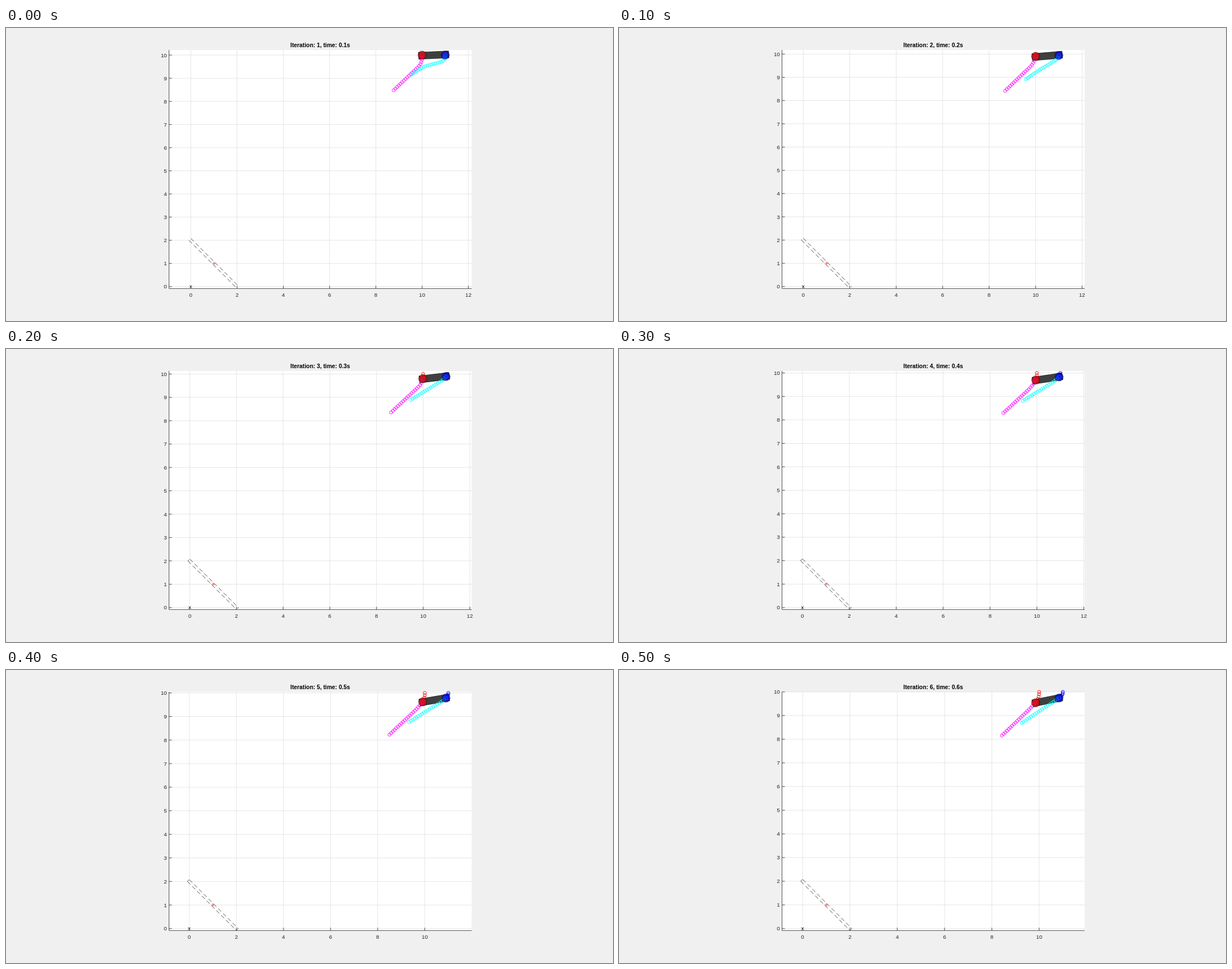
Recreate the animation shown at these times as an HTML page. Size 1078x520 px, loop 0.6 s.

```html
<!DOCTYPE html>
<html lang="en">
<head>
<meta charset="utf-8">
<style>
  html, body { margin: 0; width: 100%; height: 100%; overflow: hidden; background: #f0f0f0; }
  svg { display: block; font: 9.8px "Liberation Sans", Arial, sans-serif; }
</style>
</head>
<body>
<svg id="stage" width="1078" height="520" viewBox="0 0 1078 520"></svg>
<script>
const stage = document.getElementById('stage');
const STEP = 100, COUNT = 6;
const BOX = { left: 289.5, top: 39, right: 827, bottom: 462.4 };
const INK = '#262626';

// Plot coordinates of both axles at each step
const rear = [[10, 10], [10, 9.9], [9.98, 9.8], [9.95, 9.7], [9.91, 9.62], [9.85, 9.54]];
const front = [[11, 10], [11, 9.94], [10.98, 9.89], [10.95, 9.83], [10.9, 9.78], [10.84, 9.74]];
const originX = [328.2, 327.2, 326.4, 325.8, 325.5, 326.1];

// Screen waypoints of the planned paths, after the current axle
const rearPlan = [
  'L738.7 57L736 64.5L730 71L688.5 110.5',
  'L738 57.5L733 66L728 71L685.8 111.5',
  'L738.5 59L735 64.5L729 70.5L684 112.5',
  'L736 62.5L728 71.5L682.5 113.7',
  'L734.5 63L728 70.5L681 114.7',
  'L733 65L728 70.5L680 116.5'
];
const frontPlan = [
  'L778.5 55L775 59L769 61.3L758 64L743 68.5L731 75.5L719.5 83',
  'L778.5 55L763 65L748 73.5L722.5 91',
  'L774 56.5L759 65.5L718.5 90.5',
  'L772 58L757 67.5L717.3 92',
  'L771 58L757 66.5L716 92.5',
  'L768 59L757 66L715.2 94'
];

const probe = document.createElementNS('http://www.w3.org/2000/svg', 'path');
const path = (d, stroke, width = 0.8, extra = '') =>
  `<path d="${d}" fill="none" stroke="${stroke}" stroke-width="${width}" ${extra}/>`;
const ring = ([x, y], color) =>
  `<circle cx="${x}" cy="${y}" r="2.8" fill="none" stroke="${color}" stroke-width=".9"/>`;
const label = (x, y, text, anchor) =>
  `<text x="${x}" y="${y}" text-anchor="${anchor}" fill="${INK}">${text}</text>`;

function plan(start, route, color) {
  probe.setAttribute('d', `M${start}${route}`);
  const length = probe.getTotalLength();
  return Array.from({ length: 21 }, (_, i) => {
    const p = probe.getPointAtLength(length * i / 20);
    return ring([p.x, p.y], color);
  }).join('');
}

function wheel([x, y], color) {
  const points = Array.from({ length: 10 }, (_, i) => {
    const a = i * Math.PI / 5;
    return [x + 7.4 * Math.cos(a), y + 7.4 * Math.sin(a)];
  });
  return `<polygon points="${points.join(' ')}" fill="${color}" fill-opacity=".6" stroke="#000" stroke-width=".6"/>`;
}

function axes(px, py) {
  let grid = '', ticks = '', labels = '';
  for (let v = 0; v <= 12; v += 2) {
    const x = px(v);
    if (x > BOX.right) continue;
    grid += `M${x} ${BOX.top}V${BOX.bottom}`;
    ticks += `M${x} ${BOX.bottom}v-5`;
    labels += label(x, 476.5, v, 'middle');
  }
  for (let v = 0; v <= 10; v++) {
    const y = py(v);
    grid += `M${BOX.left} ${y}H${BOX.right}`;
    ticks += `M${BOX.left} ${y}h5`;
    labels += label(285.8, y + 3.5, v, 'end');
  }
  ticks += `M${BOX.left} ${BOX.top}V${BOX.bottom}H${BOX.right}`;
  return `<rect x="289" y="39" width="538" height="424" fill="#fff"/>`
    + path(grid, '#dfdfdf') + path(ticks, INK) + labels;
}

function parking(k, at) {
  const dash = 'stroke-dasharray="7.6 4.5"';
  const [a, b, c, d] = [[0, 2.08], [2.08, 0], [2, -0.08], [-0.08, 2]].map(at);
  const [cx, cy] = at([1, 1]), [ox, oy] = at([0, 0]);
  const cap = Math.min(k, 3);
  return path(`M${a}L${b}M${d}L${c}`, '#222', 0.8, dash)
    + path(`M${d}l${cap} ${-cap}M${b}l${-cap} ${cap}`, '#222')
    + path(`M${cx - 3} ${cy}h6M${cx} ${cy - 3}v6`, '#f00', 0.8, 'opacity=".8"')
    + path(`M${ox - 2.3} ${oy - 2.3}l4.6 4.6m0 -4.6l-4.6 4.6`, '#111');
}

function chassis(k, back, nose) {
  const x = (back[0] + nose[0]) / 2, y = (back[1] + nose[1]) / 2;
  const angle = -(2.6 + 2.4 * k - 0.13 * k * k);
  return `<rect x="-26.8" y="-6.2" width="53.6" height="12.4" transform="translate(${x} ${y}) rotate(${angle})" fill="#000" fill-opacity=".75" stroke="#000" stroke-width=".6"/>`;
}

function draw(k) {
  const scale = 41.08 + 0.185 * k;
  const px = v => originX[k] + scale * v;
  const py = v => 458.9 - scale * v;
  const at = ([x, y]) => [px(x), py(y)];
  const back = at(rear[k]), nose = at(front[k]);
  const trail = (points, color) => points.slice(0, k + 1).map(p => ring(at(p), color)).join('');

  stage.innerHTML = axes(px, py)
    + `<text x="558" y="34.3" text-anchor="middle" font-size="10.3" font-weight="bold">Iteration: ${k + 1}, time: 0.${k + 1}s</text>`
    + parking(k, at)
    + chassis(k, back, nose)
    + trail(rear, '#f00') + trail(front, '#00f')
    + plan(back, rearPlan[k], '#f0f') + plan(nose, frontPlan[k], '#0ff')
    + wheel(back, '#f00') + wheel(nose, '#00f');
}

const begin = performance.now();
let shown = -1;
function tick() {
  const k = Math.floor((performance.now() - begin) / STEP) % COUNT;
  if (k !== shown) draw(shown = k);
  requestAnimationFrame(tick);
}
tick();
</script>
</body>
</html>
```
